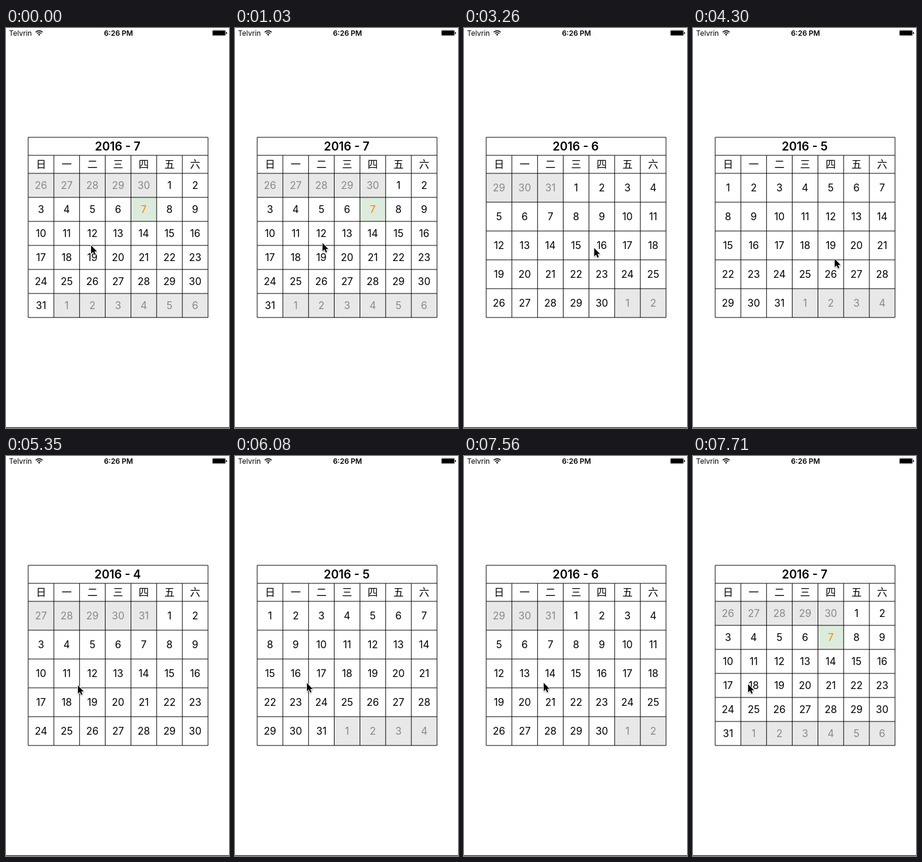
Animation of 372 by 666 pixels, one loop 8000 ms. Source, as an HTML page:

```html
<!DOCTYPE html>
<html lang="zh">
<head>
<meta charset="utf-8">
<style>
  html, body { margin: 0; width: 100%; height: 100%; overflow: hidden; background: #fff; }
  svg { display: block; font-family: Inter, Roboto, sans-serif; }
  text { text-anchor: middle; }
  .status { font-size: 12px; }
  .title { font-size: 19.5px; font-weight: 600; }
  .week { font: 17px "Noto Sans CJK SC", "Noto Sans CJK", sans-serif; }
  .day { font-size: 16.8px; }
</style>
</head>
<body>
<svg width="372" height="666" viewBox="0 0 372 666">
  <g class="status">
    <text x="5" y="12.5" style="text-anchor:start">Telvrin</text>
    <text x="187.7" y="12.5" font-weight="600">6:26 PM</text>
  </g>
  <g fill="none" stroke="#000" stroke-width="1.6">
    <path d="M49.5 7a8.2 8.2 0 0 1 11.6 0M51.7 9.2a5.1 5.1 0 0 1 7.2 0"/>
    <path d="M55.3 12.8l-1.9-1.9a2.7 2.7 0 0 1 3.8 0z" fill="#000" stroke="none"/>
  </g>
  <rect x="344.3" y="3.8" width="22" height="9" rx="1.6" fill="none" stroke="#000" stroke-width=".5"/>
  <rect x="345" y="4.5" width="20.6" height="7.6" rx="1"/>
  <path d="M367 6.8q1.8 .3 1.8 1.6t-1.8 1.6z"/>
  <rect y="665" width="372" height="1"/>
  <g id="calendar"></g>
  <path id="cursor" d="M0 0V13.8L3.2 10.8L5.5 15.8L7.6 14.9L5.5 10H9.7Z" stroke="#fff" stroke-width="1.6"
    paint-order="stroke" style="filter:drop-shadow(0 1px 1px #0005)"/>
</svg>
<script>
const LOOP = 8000, TICK = 148.3, LEFT = 37, TOP = 182, SIZE = 300, HEAD = 30;
const COL = SIZE / 7, GRID_TOP = TOP + 2 * HEAD, GRID_H = SIZE - 2 * HEAD;
const START = { x: 142, y: 362, month: 7 };

// Pointer moves: [first tick, ticks, end x, end y, months turned on arrival]
const moves = [
  [1, 3, 245, 311, 0], [4, 4, 146, 358, 0], [12, 2, 280, 346, -1],
  [15, 3, 143, 360, 0], [22, 2, 248, 369, -1],
  [25, 2, 149, 381, 0], [28, 3, 250, 385, -1],
  [34, 1, 97, 384, 0], [36, 1, 120, 382, 0], [37, 2, 237, 376, 0], [40, 2, 120, 378, 1],
  [42, 3, 235, 364, 0], [46, 1, 149, 366, 1],
  [48, 3, 232, 372, 0], [51, 2, 92, 380, 1]
];

function stateAt(tick) {
  let { x, y, month } = START;
  for (const [first, ticks, endX, endY, turn] of moves) {
    if (tick < first) break;
    const p = Math.min((tick - first + 1) / ticks, 1);
    const eased = Math.sin(p * Math.PI / 2);
    x += (endX - x) * eased;
    y += (endY - y) * eased;
    if (p === 1) month += turn;
  }
  return { x, y, month };
}

const text = (x, y, cls, str, fill = '#000') =>
  `<text x="${x}" y="${y}" class="${cls}" fill="${fill}">${str}</text>`;
const colX = c => LEFT + c * COL;
const hLine = y => `M${LEFT} ${y}h${SIZE}`;
const vLine = (x, y) => `M${x} ${y}V${TOP + SIZE}`;

function drawMonth(month) {
  const first = new Date(2016, month - 1, 1).getDay();
  const count = new Date(2016, month, 0).getDate();
  const rows = Math.ceil((first + count) / 7), rowH = GRID_H / rows;
  let cells = '', lines = hLine(TOP) + hLine(TOP + HEAD);
  let labels = text(LEFT + SIZE / 2 - .7, TOP + 21.6, 'title', `2016 - ${month}`);

  for (let i = 0; i < rows * 7; i++) {
    const c = i % 7, y = GRID_TOP + Math.floor(i / 7) * rowH;
    const day = i - first + 1;
    const outside = day < 1 || day > count;
    const today = month === 7 && day === 7;
    const fill = outside ? '#e8e8e8' : today ? '#dcebdc' : '#fff';
    const ink = outside ? '#888' : today ? '#ff8000' : '#000';
    cells += `<rect x="${colX(c)}" y="${y}" width="${COL}" height="${rowH}" fill="${fill}"/>`;
    labels += text(colX(c + .5), y + rowH / 2 + 6, 'day', new Date(2016, month - 1, day).getDate(), ink);
  }
  for (let r = 0; r <= rows; r++) lines += hLine(GRID_TOP + r * rowH);
  for (let c = 0; c <= 7; c++) lines += vLine(colX(c), c % 7 ? TOP + HEAD : TOP);
  [...'日一二三四五六'].forEach((name, c) => labels += text(colX(c + .5), TOP + HEAD + 21.3, 'week', name));
  calendar.innerHTML = `${cells}<path d="${lines}" stroke="#000" fill="none"/>${labels}`;
}

const calendar = document.getElementById('calendar');
const cursor = document.getElementById('cursor');
let shown;

function frame() {
  const t = performance.now() % LOOP;
  const { x, y, month } = stateAt(Math.floor((t + 10) / TICK));
  if (month !== shown) drawMonth(shown = month);
  cursor.setAttribute('transform', `translate(${x} ${y})`);
  requestAnimationFrame(frame);
}
frame();
</script>
</body>
</html>
```
